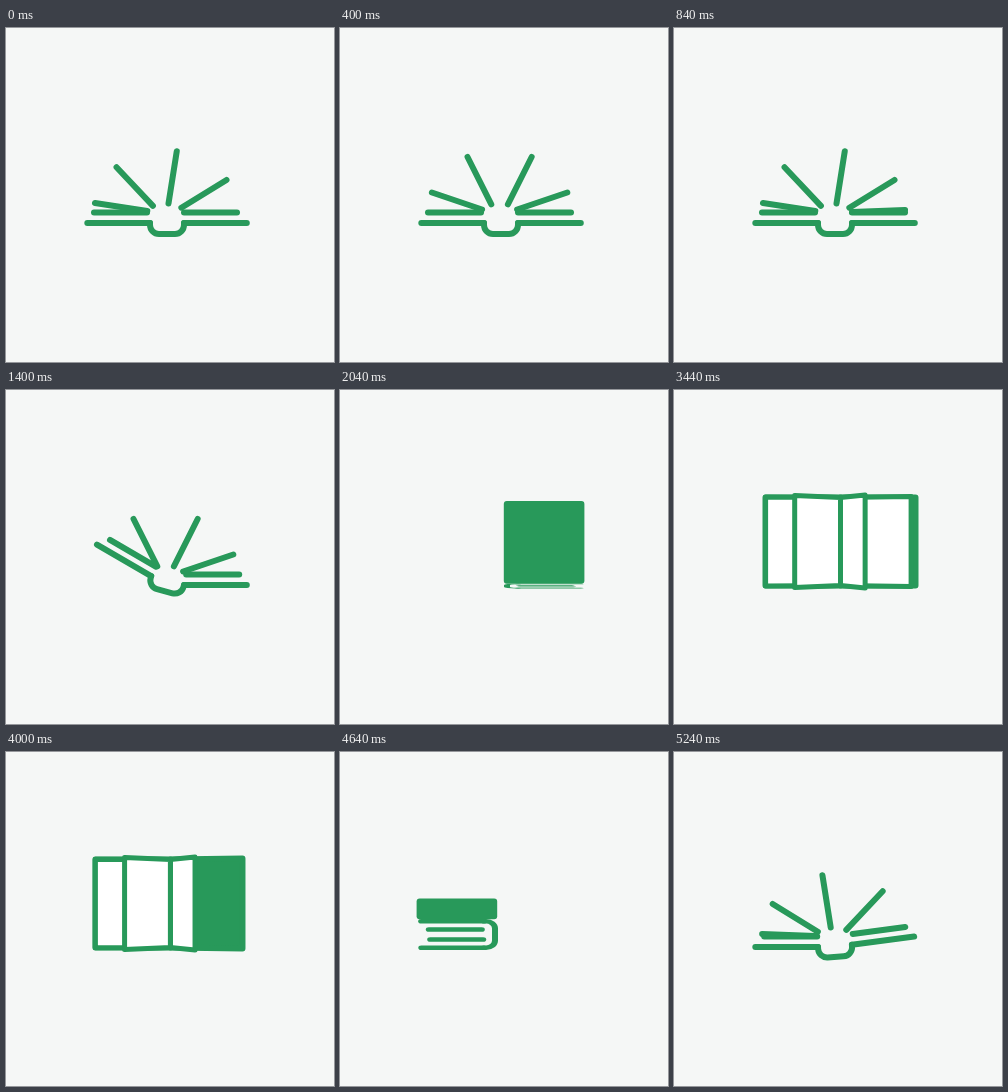
These frames come from a looping animation (328x334 px, 5.28 s). An HTML page with a canvas:

```html
<!DOCTYPE html>
<html lang="en">
<head>
<meta charset="utf-8">
<title>Book loader</title>
<style>
html, body { margin: 0; width: 100%; height: 100%; overflow: hidden; background: #f5f7f6; }
canvas { display: block; width: 328px; height: 334px; }
</style>
</head>
<body>
<canvas id="stage"></canvas>
<script>
const W = 328, H = 334, LOOP = 5280, STEP = 40, TURN = 600;
const GREEN = '#28995a', WHITE = '#ffffff', PAPER = '#f5f7f6';

// Key moments in ms
const SIDE_CLOSE = 1244, TILT_UP = SIDE_CLOSE + TURN, FRONT_OPEN = 2094;
const FRONT_CLOSE = 3870, TILT_DOWN = FRONT_CLOSE + TURN, SIDE_OPEN = 4714;
const SLIDE = 3840, SLIDE_BY = -12;

const series = (first, count) => Array.from({ length: count }, (_, i) => first + 120 * i);
const sidePages = [...series(-440, 11), ...series(920, 3)];
const frontPages = [...series(2220, 10), 3460, ...series(3620, 2)];
const lastFrontPage = frontPages[frontPages.length - 1];

const canvas = document.getElementById('stage');
const ctx = canvas.getContext('2d');
const ratio = window.devicePixelRatio || 1;
canvas.width = W * ratio;
canvas.height = H * ratio;

const clamp = v => Math.min(1, Math.max(0, v));
const ease = v => { const u = clamp(v); return u * u * (3 - 2 * u); };
const turn = (t, start) => Math.PI * ease((t - start) / TURN);

function line(x1, y1, x2, y2) {
  ctx.beginPath();
  ctx.moveTo(x1, y1);
  ctx.lineTo(x2, y2);
  ctx.stroke();
}

function rotateAt(x, y, angle) {
  ctx.translate(x, y);
  ctx.rotate(angle);
  ctx.translate(-x, -y);
}

function group(draw) {
  ctx.save();
  draw();
  ctx.restore();
}

// Edge-on view

function spine() {
  ctx.beginPath();
  ctx.moveTo(144, 195);
  ctx.arcTo(144, 206, 153, 206, 9);
  ctx.arcTo(178, 206, 178, 197, 9);
  ctx.lineTo(178, 195);
  ctx.stroke();
}

function leftBoard(shift) {
  line(81.3, 195, 144, 195);
  line(88 + shift, 184.4, 141 + shift, 184.4);
}

function rightBoard(shift) {
  line(178, 195, 240.8, 195);
  line(178 + shift, 184.4, 231 + shift, 184.4);
}

function sidePage(angle) {
  const c = -Math.cos(angle), s = Math.sin(angle), y = 184.4 + 9.5 * s;
  line(159.6 + 18.5 * c, y - 18.5 * s, 159.6 + 71.5 * c, y - 71.5 * s);
}

function sideView(t, leftAngle, rightAngle) {
  const shift = t < 0 || t > 1160 ? 2.2 : 0;
  ctx.lineWidth = 6;
  group(() => {
    if (rightAngle) {
      leftBoard(shift);
      rotateAt(144, 195, -rightAngle / 2);
      spine();
      rotateAt(178, 195, -rightAngle / 2);
      rightBoard(shift);
    } else {
      rightBoard(shift);
      rotateAt(178, 195, leftAngle / 2);
      spine();
      rotateAt(144, 195, leftAngle / 2);
      leftBoard(shift);
    }
  });
  for (const start of sidePages) {
    if (t > start && t < start + TURN) sidePage(turn(t, start));
  }
}

// Closed book tipping between the two views

function tiltView(p, onRight) {
  const edge = 40 * (1 - p), top = 198.5 - edge - 94 * p;
  group(() => {
    ctx.translate(0, 198.5);
    ctx.scale(1, Math.max(1 - p, 0.001));
    ctx.translate(0, -198.5);
    if (onRight) sideView(TILT_UP, Math.PI, 0);
    else sideView(SIDE_OPEN - LOOP, 0, Math.PI);
  });
  ctx.beginPath();
  ctx.roundRect(onRight ? 163.8 : 76.6, top, 80.6, Math.max(198.5 - edge - top, 6), 3);
  ctx.fill();
}

// View from above

function leaf(angle, fill, weight) {
  const zoom = 1 / (1 - 0.055 * Math.sin(angle));
  const x = Math.max(-75, Math.min(75, 76 * Math.cos(angle) * zoom)), y = 44 * zoom;
  ctx.beginPath();
  ctx.moveTo(0, -44);
  ctx.lineTo(x, -y);
  ctx.lineTo(x, y);
  ctx.lineTo(0, 44);
  ctx.closePath();
  ctx.fillStyle = fill;
  ctx.lineWidth = weight;
  ctx.fill();
  ctx.stroke();
}

function frontView(t) {
  const opening = turn(t, FRONT_OPEN), closing = turn(t, FRONT_CLOSE), half = Math.PI / 2;
  const pages = frontPages.filter(s => t > s && t < s + TURN).map(s => turn(t, s));
  group(() => {
    ctx.translate(166.5 + SLIDE_BY * ease((t - SLIDE) / TURN), 151.5);
    if (closing < half) leaf(closing, t > lastFrontPage ? GREEN : WHITE, 6);
    if (opening >= half) leaf(opening, WHITE, 6);
    pages.filter(a => a < half).reverse().forEach(a => leaf(a, WHITE, 5));
    pages.filter(a => a >= half).forEach(a => leaf(a, WHITE, 5));
    if (opening < half) leaf(opening, GREEN, 6);
    if (closing >= half) leaf(closing, GREEN, 6);
  });
}

function render(t) {
  ctx.setTransform(ratio, 0, 0, ratio, 0, 0);
  ctx.fillStyle = PAPER;
  ctx.fillRect(0, 0, W, H);
  ctx.fillStyle = ctx.strokeStyle = GREEN;
  ctx.lineCap = ctx.lineJoin = 'round';
  if (t < TILT_UP) sideView(t, turn(t, SIDE_CLOSE), 0);
  else if (t < FRONT_OPEN) tiltView(ease((t - TILT_UP) / (FRONT_OPEN - TILT_UP)), true);
  else if (t < TILT_DOWN) frontView(t);
  else if (t < SIDE_OPEN) tiltView(1 - ease((t - TILT_DOWN) / (SIDE_OPEN - TILT_DOWN)), false);
  else sideView(t - LOOP, 0, Math.PI - turn(t, SIDE_OPEN));
}

const began = performance.now();
function tick() {
  const t = (performance.now() - began) % LOOP;
  render(Math.floor(t / STEP) * STEP);
  requestAnimationFrame(tick);
}
tick();
</script>
</body>
</html>
```
